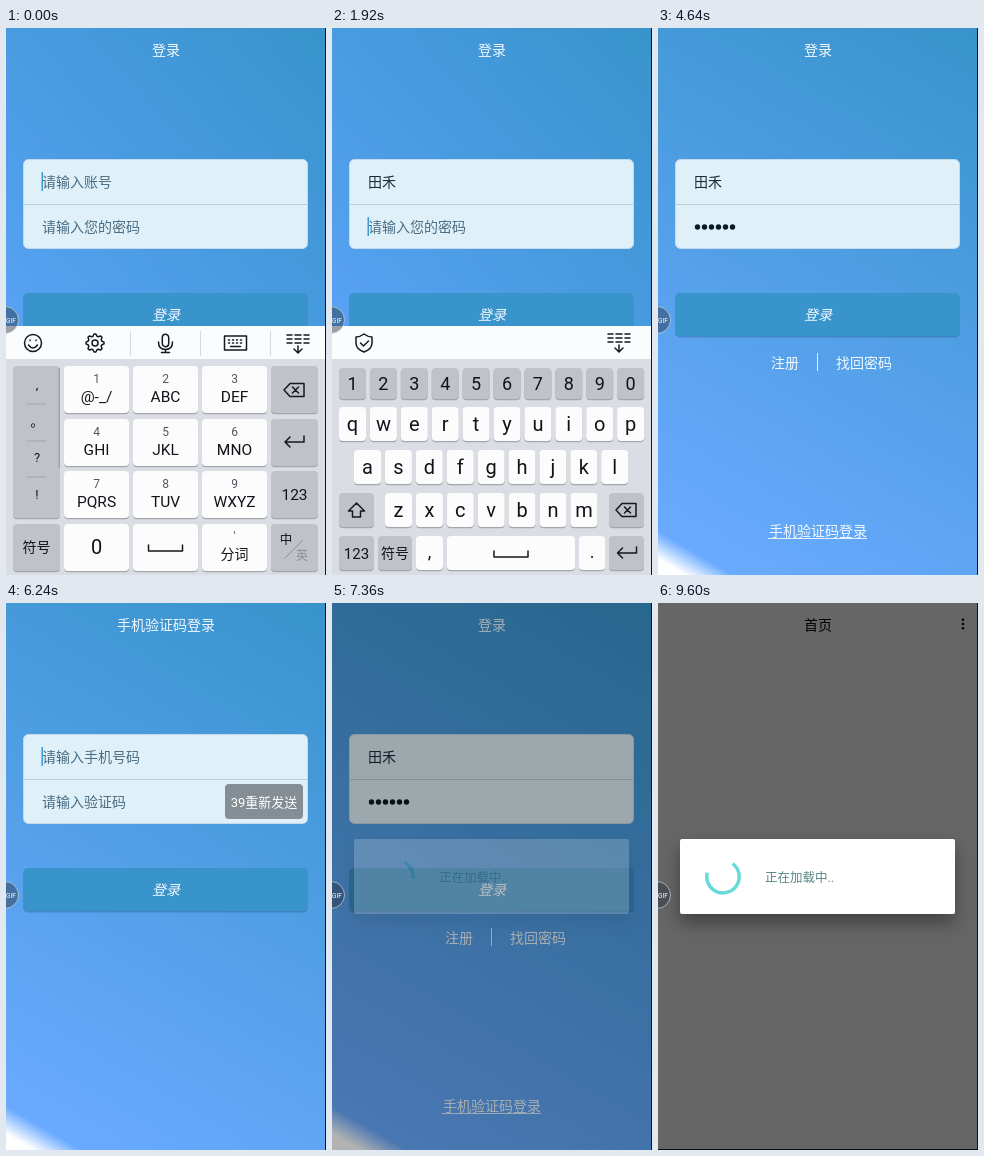
An HTML page that plays this animation: 320x547 px, repeating every 9760 ms.

```html
<!DOCTYPE html>
<html lang="zh-CN">
<head>
<meta charset="utf-8">
<title>登录</title>
<style>
html, body { margin: 0; width: 100%; height: 100%; overflow: hidden; background: #000; }
svg { display: block; width: 320px; height: 547px; font-family: Roboto, "Noto Sans CJK SC", "Noto Sans CJK", sans-serif; }
.icon { fill: none; stroke: #15181c; stroke-width: 1.5; stroke-linecap: round; stroke-linejoin: round; }
.dialog { filter: drop-shadow(0 9px 9px rgba(0, 0, 0, .36)); }
</style>
</head>
<body>
<svg viewBox="0 0 320 547">
  <defs>
    <linearGradient id="tall" gradientUnits="userSpaceOnUse" x1="0" y1="547" x2="320" y2="0">
      <stop offset=".022" stop-color="#fff"/><stop offset=".06" stop-color="#69aaff"/><stop offset="1" stop-color="#3893cb"/>
    </linearGradient>
    <linearGradient id="short" gradientUnits="userSpaceOnUse" x1="0" y1="298" x2="320" y2="0">
      <stop offset="0" stop-color="#58a2f4"/><stop offset="1" stop-color="#3893cb"/>
    </linearGradient>
  </defs>
  <g id="stage"></g>
</svg>
<script>
const LOOP = 9760, TICK = 160;
const GREY = '#bfc2c9', WHITE = '#fcfcfd', INK = '#101418';

// Each entry changes part of the state from its time on.
const steps = [
  [0, { kb: 'nine', drop: 0, focus: 0, name: '', pw: 0, open: false, press: '', cand: '', side: ',。?!',
        phoneX: 320, send: '获取验证码', homeX: 320, dim: 0, box: 0, tap: 0 }],
  [320, { press: '8', cand: '他 天 团 同 听', side: 'tuv' }],
  [480, { press: '' }],
  [640, { press: '4', cand: '田禾 他会 天黑', side: 'tuv' }],
  [800, { press: '' }],
  [1280, { name: '田禾', cand: '', side: ',。?!' }],
  [1600, { focus: 1 }],
  [1760, { kb: 'letters', drop: 90 }],
  [1920, { drop: 0 }],
  [2560, { press: '123' }],
  [2720, { press: '', kb: 'digits', side: ',:/-' }],
  ...[0, 1, 2, 3, 4, 5, 6].map(i => [3200 + i * TICK, { pw: i, open: i > 0, press: i < 6 ? String(i + 1) : '' }]),
  [4320, { open: false, drop: 80 }],
  [4480, { drop: 190 }],
  [4640, { kb: '', focus: -1 }],
  [5280, { phoneX: 190 }],
  [5440, { phoneX: 45 }],
  [5600, { phoneX: 0 }],
  [5760, { send: '40重新发送' }],
  [6240, { send: '39重新发送' }],
  [6400, { phoneX: 170 }],
  [6560, { phoneX: 320 }],
  [6880, { tap: .08 }],
  [7040, { tap: .14 }],
  [7200, { tap: .06 }],
  [7360, { tap: 0, dim: .3, box: .19 }],
  [7520, { dim: .6, box: 1 }],
  [7680, { homeX: 110 }],
  [7840, { homeX: 0 }]
];

const text = (x, y, s, size = 14, fill = INK, more = 'text-anchor="middle"') =>
  `<text x="${x}" y="${y}" font-size="${size}" fill="${fill}" ${more}>${s}</text>`;
const rect = (x, y, w, h, fill, r = 0, more = '') =>
  `<rect x="${x}" y="${y}" width="${w}" height="${h}" rx="${r}" fill="${fill}" ${more}/>`;
const icon = (x, y, d, more = '') => `<path class="icon" transform="translate(${x} ${y})" d="${d}" ${more}/>`;
const move = (x, y, s) => `<g transform="translate(${x} ${y})">${s}</g>`;
const disc = (x, y, r, fill, more = '') => `<circle cx="${x}" cy="${y}" r="${r}" fill="${fill}" ${more}/>`;

const ICON = {
  back: 'M-10 0l6-6.5h14v13h-14zM-1.5-3l6 6m0-6l-6 6',
  enter: 'M10-6v6h-19m5-5l-5 5 5 5',
  shift: 'M0-7l8 8h-4v6h-8v-6h-4z',
  space: 'M-17-3v6h34v-6',
  hide: 'M-11-8h5m3 0h6m3 0h5M-11-4h5m3 0h6m3 0h5M-11 0h5m3 0h6m3 0h5M0 3v6m-4-3l4 4 4-4',
  shield: 'M0-9q4 3 8 3v6q0 6-8 9q-8-3-8-9v-6q4 0 8-3zM-3.5 0l3 3 5-5',
  smile: 'M-8.5 0a8.5 8.5 0 1 0 17 0a8.5 8.5 0 1 0-17 0M-4.5 2q4.5 6 9 0M-3-3v.6M3-3v.6',
  mic: 'M-3.2-5.5a3.2 3.2 0 0 1 6.4 0v6a3.2 3.2 0 0 1-6.4 0zM-7-1q0 7.500 7 7.500t7-7.500M0 6.500v3m-4 0h8',
  board: 'M-11-7h22v14h-22zM-7-3h1m3 0h1m3 0h1m3 0h1M-7 0h1m3 0h1m3 0h1m3 0h1M-5 3.500h10'
};
ICON.gear = 'M-3 0a3 3 0 1 0 6 0a3 3 0 1 0-6 0' + Array.from({ length: 32 }, (_, i) => {
  const a = (i - .5) * Math.PI / 16, r = i % 4 < 2 ? 9 : 7;
  return (i ? 'L' : 'M') + (r * Math.cos(a)).toFixed(1) + ' ' + (r * Math.sin(a)).toFixed(1);
}).join('') + 'z';

const key = (x, y, w, h, fill, inner = '') =>
  rect(x, y + 1.2, w, h, '#a3a6ac', 4) + rect(x, y, w, h, fill, 4) + inner;

// Column and row origins of the large-key layouts
const COL = [58, 127, 196], ROW = [338, 391, 443, 496];

function sidePanel(s) {
  const marks = [...s.side].map((c, i) => text(31, 361 + i * 36.5, c, 13)).join('');
  const lines = [375.5, 412.5, 448.5].map(y => rect(21, y, 19, 1, '#a2a5ab')).join('');
  return key(7, 338, 47, 152, GREY, lines + marks) + rect(52.500, 340, 1.500, 100, '#a0a3a9');
}

function bigKeys(s) {
  const nine = s.kb === 'nine';
  const letters = ['@-_/', 'ABC', 'DEF', 'GHI', 'JKL', 'MNO', 'PQRS', 'TUV', 'WXYZ'];
  let out = sidePanel(s);
  letters.forEach((l, i) => {
    const x = COL[i % 3], y = ROW[i / 3 | 0], n = String(i + 1), mid = x + 32.5;
    out += key(x, y, 65, 47, s.press === n ? GREY : WHITE, nine
      ? text(mid, y + 17, n, 12, '#50575e') + text(mid, y + 36, l, 15.5)
      : text(mid, y + 31, n, 20));
  });
  const right = (i, inner) => key(265, ROW[i], 47, 47, GREY, inner);
  out += right(0, icon(288, 362, ICON.back)) + right(1, icon(288, 414, ICON.enter));
  out += key(7, 496, 47, 47, GREY, text(30.5, 524, '符号'));
  if (nine) {
    out += right(2, text(288.500, 472, '123', 15.500));
    out += key(58, 496, 65, 47, WHITE, text(90.500, 526, '0', 20));
    out += key(127, 496, 65, 47, WHITE, icon(159.500, 520, ICON.space));
    out += key(196, 496, 65, 47, WHITE, text(228.500, 513, "'", 12, '#50575e') + text(228.500, 531, '分词'));
    out += right(3, text(280, 516, '中', 12.500, INK, 'text-anchor="middle" font-weight="500"')
      + icon(288, 521, 'M-9 9L9-9', 'style="stroke:#8e9196;stroke-width:1"') + text(296, 532, '英', 12, '#8a8d92'));
  } else {
    out += right(2, icon(288, 467, ICON.space)) + right(3, text(288.500, 524, '返回'));
    ['+', '0', '.'].forEach((c, i) => out += key(COL[i], 496, 65, 47, WHITE, text(COL[i] + 32.5, 526, c, 20)));
  }
  return out;
}

function letterKeys(s) {
  const row = (chars, x, y, h, fill, size) => [...chars].map((c, i) =>
    key(x + i * 30.9, y, 27, h, fill, text(x + i * 30.9 + 13.5, y + h / 2 + 6.5, c, size))).join('');
  return row('1234567890', 7, 340, 31, GREY, 18) + row('qwertyuiop', 7, 379, 34, WHITE, 20)
    + row('asdfghjkl', 22, 422, 34, WHITE, 20) + row('zxcvbnm', 53, 465, 34, WHITE, 20)
    + key(7, 465, 35, 34, GREY, icon(24.5, 482, ICON.shift))
    + key(277, 465, 35, 34, GREY, icon(294, 482, ICON.back))
    + key(7, 508, 35, 34, s.press === '123' ? '#a6a9b0' : GREY, text(24.5, 531, '123', 15))
    + key(46, 508, 34, 34, GREY, text(63, 530, '符号'))
    + key(84, 508, 27, 34, WHITE, text(97.5, 530, ',', 18))
    + key(115, 508, 128, 34, WHITE, icon(179, 526, ICON.space))
    + key(247, 508, 26, 34, WHITE, text(260, 530, '.', 18))
    + key(277, 508, 35, 34, GREY, icon(294.5, 525, ICON.enter));
}

function keyboard(s) {
  if (!s.kb) return '';
  let bar = rect(0, 298, 320, 249, '#dadde3') + rect(0, 298, 320, 33, '#fbfcfd');
  if (s.cand) {
    bar += text(12, 321, s.cand, 16, INK, 'xml:space="preserve" word-spacing="14"') + icon(292, 315, 'M-6-3l6 6 6-6');
  } else if (s.kb === 'nine') {
    bar += [['smile', 27], ['gear', 89], ['mic', 159.5], ['board', 229.5], ['hide', 292]]
      .map(([n, x]) => icon(x, 315, ICON[n])).join('');
    bar += [124, 194, 264].map(x => rect(x, 303, 1, 25, '#d6d9dd')).join('');
  } else {
    bar += icon(32, 315, ICON.shield) + icon(287, 314, ICON.hide);
  }
  return move(0, s.drop, bar + (s.kb === 'letters' ? letterKeys(s) : bigKeys(s)));
}

const caret = (x, y) => rect(x - .5, y, 1.5, 19, '#3a9ad2');
const left = 'text-anchor="start"';
const field = (y, s, hint) => text(36, y, s, 14, hint ? '#4a6c82' : '#182c3a', left);

function page(title, body, tap, short) {
  return rect(0, 0, 320, 547, short ? 'url(#short)' : 'url(#tall)')
    + text(160, 27, title, 14, '#f1f8fd')
    + rect(17.5, 131.5, 284, 89, '#e0f0f8', 5, 'stroke="#c3dbe8"') + rect(18, 176, 283, 1, '#b9d0df')
    + rect(17, 266.500, 285, 43, 'rgba(20,70,120,.3)', 5) + rect(17, 265, 285, 43, '#3a94cc', 5)
    + rect(17, 265, 285, 43, `rgba(0,0,0,${tap})`, 5)
    + text(160, 292, '登录', 14, '#f4fafe', 'text-anchor="middle" font-style="italic"') + body;
}

function login(s) {
  let body = s.name ? field(159, s.name) : field(159, '请输入账号', true);
  if (!s.pw) body += field(204, '请输入您的密码', true);
  const dots = s.open ? s.pw - 1 : s.pw;
  for (let i = 0; i < dots; i++) body += disc(39.5 + i * 7, 199, 2.7, '#0c1a24');
  if (s.open) body += text(36 + dots * 7, 204, s.pw, 15, '#182c3a', left);
  if (s.focus === 0) body += caret(s.name ? 65 : 36, 144);
  if (s.focus === 1) body += caret(36 + dots * 7 + (s.open ? 9.5 : 0), 189);
  body += text(127, 340, '注册', 14, '#f1f8fd') + rect(159, 325, 1, 18, '#e4effa') + text(206, 340, '找回密码', 14, '#f1f8fd')
    + text(160, 508, '手机验证码登录', 14, '#f1f8fd') + rect(110, 510, 99, 1, '#e4effa');
  return page('登录', body, s.tap, s.kb && !s.drop);
}

const phone = s => page('手机验证码登录', field(159, '请输入手机号码', true) + field(204, '请输入验证码', true)
  + caret(36, 144) + rect(219, 181, 78, 35, '#858e94', 4) + text(258, 203.500, s.send, 13, '#fff'), 0, false);

const home = () => rect(0, 0, 320, 547, '#fff') + text(160, 27, '首页', 14, '#000')
  + [16.8, 21, 25.2].map(y => disc(305, y, 1.3, '#000')).join('') + rect(0, 546, 320, 1, '#222');

// Standard fast-out-slow-in easing, cubic-bezier(.4, 0, .2, 1)
function ease(x) {
  let lo = 0, hi = 1;
  for (let i = 0; i < 20; i++) {
    const u = (lo + hi) / 2, v = 1 - u;
    if (1.2 * v * v * u + .6 * v * u * u + u * u * u < x) lo = u; else hi = u;
  }
  return 3 * (1 - lo) * lo * lo + lo ** 3;
}

// Ring arc in degrees clockwise from the top: [start, sweep]
function arcAt(t) {
  const d = t - 7840, cycle = 1333;
  if (d < 0) return [65 + d * 38 / 480, 230 + d / 3];
  const trims = ms => {
    const p = ms % cycle / cycle * 2;
    return [270 * ease(Math.max(0, p - 1)), 270 * ease(Math.min(1, p))];
  };
  const [from, to] = trims(d + 350);
  return [65 + from + d * (720 / 6665 + 90 / cycle), Math.max(4, to - from)];
}

function spinner(t) {
  const [start, sweep] = arcAt(t), r = 16.2;
  const at = deg => {
    const a = deg * Math.PI / 180;
    return (65 + r * Math.sin(a)).toFixed(2) + ' ' + (273.7 - r * Math.cos(a)).toFixed(2);
  };
  return `<path d="M${at(start)}A${r} ${r} 0 ${sweep > 180 ? 1 : 0} 1 ${at(start + sweep)}" fill="none" stroke="#67dbd8" stroke-width="3.5"/>`;
}

const dialog = (s, t) => s.box ? `<g opacity="${s.box}">` + rect(22, 236, 275, 75, '#fff', 2, 'class="dialog"')
  + spinner(t) + text(107, 278.500, '正在加载中..', 12.5, '#588783', left) + '</g>' : '';

const badge = disc(-1, 292, 13.5, 'rgba(40,52,64,.45)', 'stroke="rgba(215,220,222,.65)"')
  + text(0, 294.500, 'GIF', 6.500, '#fff', left);

function draw(t) {
  const s = Object.assign({}, ...steps.filter(e => e[0] <= t).map(e => e[1]));
  let out = move((s.phoneX - 320) / 4, 0, login(s));
  if (s.phoneX < 320) out += move(s.phoneX, 0, phone(s));
  if (s.homeX < 320) out += move(s.homeX, 0, home());
  out += keyboard(s) + rect(0, 0, 320, 547, `rgba(0,0,0,${s.dim})`) + dialog(s, t);
  return out + badge + rect(319, 0, 1, 547, '#0b141b');
}

const stage = document.getElementById('stage'), begin = performance.now();
let shown = -1;
function tick() {
  const t = Math.floor((performance.now() - begin) % LOOP / TICK) * TICK;
  if (t !== shown) stage.innerHTML = draw(shown = t);
  requestAnimationFrame(tick);
}
tick();
</script>
</body>
</html>
```
